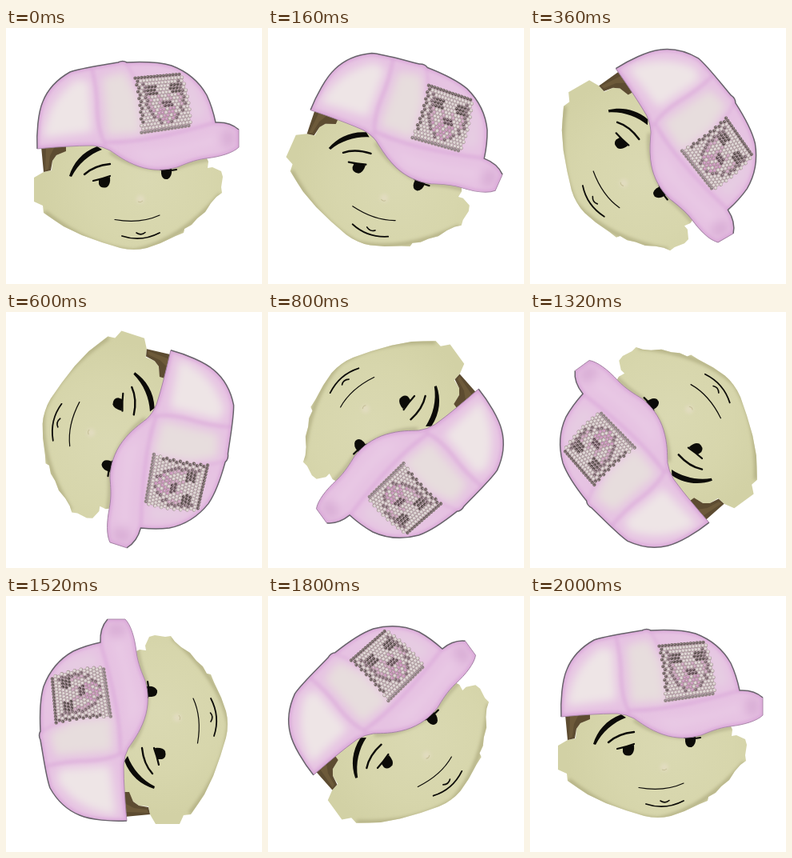
Write an HTML page that moves like this. It is 320x320 px and loops after 2.04 s.

```html
<!DOCTYPE html>
<html lang="en">
<head>
<meta charset="utf-8">
<title>Spinning head</title>
<style>
html, body { margin: 0; width: 100%; height: 100%; overflow: hidden; background: #fff; }
svg { display: block; width: 100vw; height: 100vh; }
.ink { fill: none; stroke: #0c0b08; stroke-linecap: round; stroke-linejoin: round; }
</style>
</head>
<body>
<svg viewBox="0 0 320 320">
  <defs>
    <filter id="soft" x="-50%" y="-50%" width="200%" height="200%"><feGaussianBlur stdDeviation="6"/></filter>
    <filter id="haze" x="-50%" y="-50%" width="200%" height="200%"><feGaussianBlur stdDeviation="2.2"/></filter>
    <radialGradient id="skin" gradientUnits="userSpaceOnUse" cx="175" cy="190" r="130">
      <stop offset="0" stop-color="#dad9b2"/>
      <stop offset=".6" stop-color="#d7d6ac"/>
      <stop offset="1" stop-color="#d2d1a5"/>
    </radialGradient>
    <path id="faceShape" d="M47 180L35 187V217L46 222L47 231L60 240L72 248L95 259L120 268L143 275Q160 279 176 275L193 269L212 260L222 256L223 251L232 246L239 238L249 230L256 219L263 211L270 206L269 199L271 186L269 179L258 174L252 175L253 167L240 140H74V154L63 159L58 166L57 178Z"/>
    <path id="crown" d="M39 151C38 132 40 106 46 92C52 77 64 64 80 55C94 50 118 47 140 43Q146 40 151 43C172 42 190 42 207 47C228 55 242 68 251 84Q258 99 262 118Q280 117 291 127"/>
    <path id="capShape" d="M39 151C38 132 40 106 46 92C52 77 64 64 80 55C94 50 118 47 140 43Q146 40 151 43C172 42 190 42 207 47C228 55 242 68 251 84Q258 99 262 118Q280 117 291 127V149C284 156 268 161 250 163C235 165 224 170 214 174C200 178 183 179 166 173C149 167 139 159 130 153Q121 148 109 147C86 147 61 149 39 151Z"/>
    <clipPath id="faceClip"><use href="#faceShape"/></clipPath>
    <clipPath id="capClip"><use href="#capShape"/></clipPath>
  </defs>

  <g id="head">
    <use href="#faceShape" fill="url(#skin)"/>
    <g clip-path="url(#faceClip)">
      <path d="M48 230Q105 275 160 279Q218 267 268 208" fill="none" stroke="#b3b084" stroke-width="5" filter="url(#haze)"/>
      <path d="M130 155C147 168 180 181 212 175C228 169 242 165 260 163" fill="none" stroke="#a9a681" stroke-width="3" filter="url(#haze)"/>
      <ellipse cx="168" cy="214" rx="5" ry="5" fill="#e2dcc0" filter="url(#haze)"/>
      <path d="M165 217Q168 219 171 216" fill="none" stroke="#c6bf98"/>
    </g>
    <path d="M44 148H75V154L63 159L58 166L56 178L47 180Z" fill="#5d4c31"/>
    <path d="M50 150H60L55 160L53 176L49 178Z" fill="#6d5a3a"/>

    <path d="M79 185C84 169 95 155 114 148L120 152C104 158 90 170 82 186Z" fill="#0c0b08"/>
    <path class="ink" d="M98 183Q110 172 130 170" stroke-width="2.4"/>
    <path class="ink" d="M109 191Q119 189 130 185" stroke-width="2.2"/>
    <path d="M116 189L130 186Q131 196 126 199Q118 201 116 195Z" fill="#0c0b08"/>
    <path class="ink" d="M193 177Q204 179 213 177" stroke-width="2.2"/>
    <path d="M194 176H207Q208 186 202 189Q195 190 194 182Z" fill="#0c0b08"/>
    <path class="ink" d="M136 239.5Q168 245 192 234" stroke-width="1.2"/>
    <path class="ink" d="M145 260Q169 268 192 256" stroke-width="1.8"/>
    <path class="ink" d="M163 256Q169 260 174 255.5" stroke-width="1.6"/>

    <use href="#capShape" fill="#e6c2e2"/>
    <g clip-path="url(#capClip)">
      <g filter="url(#soft)">
        <path d="M46 138Q50 92 88 64L104 66L108 130Z" fill="#eee5e6"/>
        <path d="M120 62L148 54L164 84L170 132L126 134Z" fill="#e7dddd"/>
        <path d="M165 51Q210 46 236 75L250 108L232 118L220 58Z" fill="#e6cde2"/>
        <path d="M150 152Q205 155 262 134L266 144Q215 158 178 167Z" fill="#e9cae5"/>
        <ellipse cx="278" cy="138" rx="9" ry="12" fill="#d9aed6"/>
      </g>
      <g fill="none" stroke="#d9a5d8" filter="url(#haze)">
        <use href="#capShape" stroke-width="5"/>
        <path d="M107 49Q114 76 114 103Q115 128 124 146" stroke-width="2.4"/>
        <path d="M148 43Q160 55 164 76" stroke-width="1.6"/>
        <path d="M124 143C160 144 211 133 262 118" stroke-width="2.6"/>
      </g>
    </g>
    <use href="#crown" fill="none" stroke="#68636b" stroke-width="1.5"/>
    <path d="M291 127V149C284 156 268 161 250 163C235 165 224 170 214 174C200 178 183 179 166 173C149 167 139 159 130 153Q121 148 109 147C86 147 61 149 39 151" fill="none" stroke="#a585a5" stroke-width=".9"/>

    <g id="gems"></g>
  </g>
</svg>
<script>
const NS = "http://www.w3.org/2000/svg";
const head = document.getElementById("head");
const gems = document.getElementById("gems");
const COLS = 15, ROWS = 17;

function dot(x, y, r, fill) {
  const c = document.createElementNS(NS, "circle");
  Object.entries({ cx: x, cy: y, r, fill }).forEach(([k, v]) => c.setAttribute(k, v));
  gems.append(c);
}

const within = (c, r, c0, r0, c1, r1) => c >= c0 && c <= c1 && r >= r0 && r <= r1;

// Rhinestone face: dark rim, eyes and nose, pink cheeks and chin.
function gemColor(c, r) {
  const jaw = Math.abs(c - 7.5) + Math.max(0, r - 9) * 0.75;
  if (r === 0 || (c === 0 && r < 14)) return "#685a5c";
  if (within(c, r, 3, 3, 5, 5) || within(c, r, 10, 3, 12, 5)) return "#544748";
  if (within(c, r, 7, 8, 9, 9)) return "#5c4650";
  if (r > 1 && r < 15 && jaw > 5.2 && jaw < 6.1) return "#7a646e";
  if (r > 9 && r < 15 && jaw < 5 && (c + r) % 3) return "#cb92bd";
  if (r > 5 && r < 10 && jaw < 5 && c % 3 === 0) return "#cfa3c1";
  if (r === ROWS - 1) return "#8b7e82";
  return "#ddd4d3";
}

// The patch follows the curve of the crown, so its sides lean most at the top.
for (let r = 0; r < ROWS; r++) {
  for (let c = 0; c < COLS; c++) {
    const u = (c + (r % 2) / 2) / (COLS - 0.5), v = r / (ROWS - 1);
    const lean = v * (2 - v);
    const x = 161.5 + 57 * u + (8 + 4 * u) * lean;
    const y = 62.5 - 5 * u + 68 * v - 4 * u * v;
    dot(x, y + 0.3, 2.3, "#a0918f");
    dot(x, y, 1.75, gemColor(c, r));
    dot(x - 0.4, y - 0.5, 0.5, "#e8e1df");
  }
}

// Six degrees per step, with every sixth pose skipped.
function draw() {
  const step = Math.floor((performance.now() % 2040) / 40);
  const angle = 6 * (step + Math.floor(step / 5));
  head.setAttribute("transform", `rotate(${angle} 160 160)`);
  requestAnimationFrame(draw);
}
draw();
</script>
</body>
</html>
```
